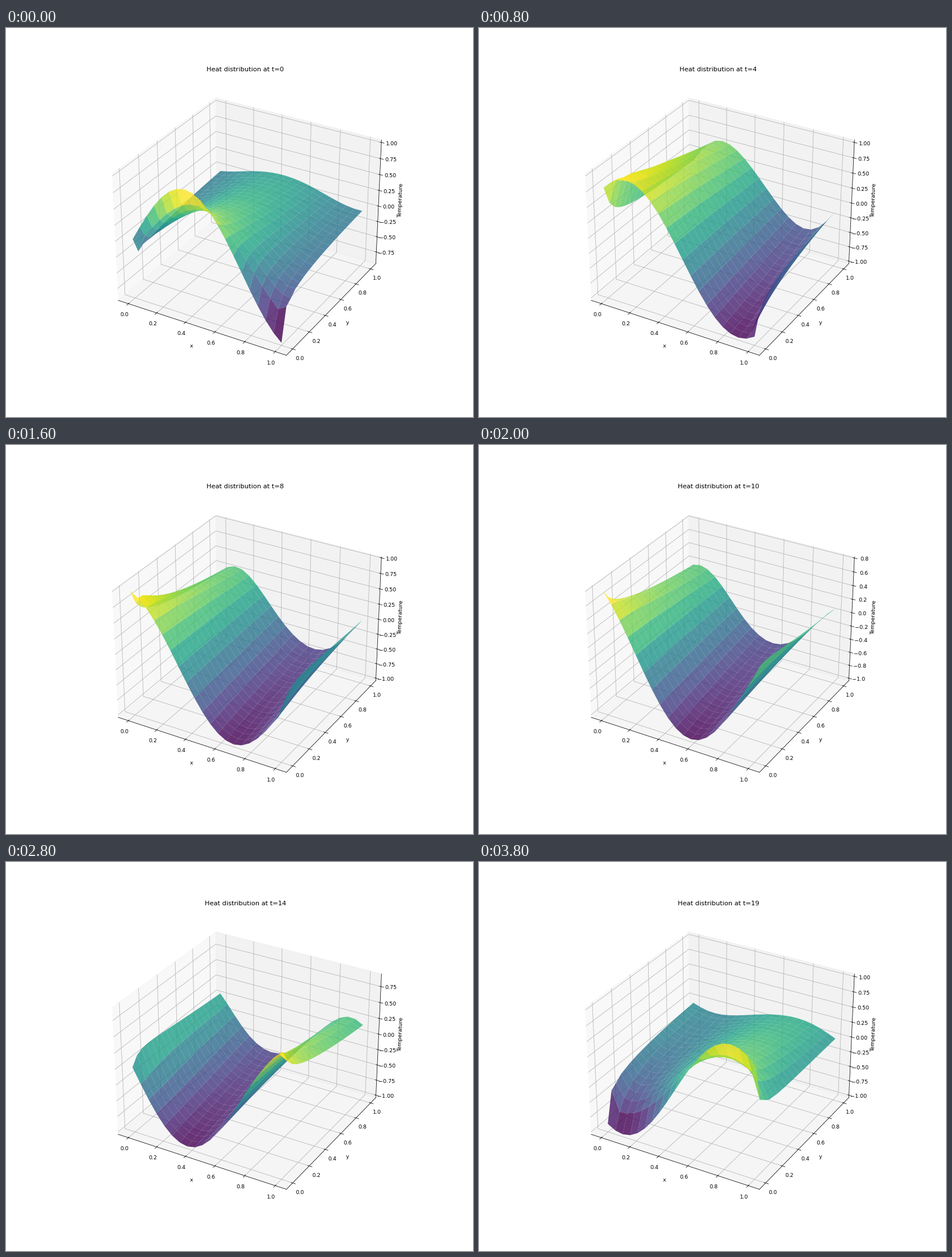
Animation of 820x683 px, one loop 4 s. Source, as a matplotlib script:

```python
import numpy as np
import matplotlib.pyplot as plt
from matplotlib.animation import FuncAnimation

N = 20           # samples along each axis
RATE = 0.19      # diffusion number per step
WAVE = 4.27      # wave number of the starting field
DPI = 820 / 12


def diffuse(u):
    """One explicit heat step on a periodic grid."""
    near = sum(np.roll(u, s, axis=a) for a in (0, 1) for s in (-1, 1))
    return u + RATE * (near - 4 * u)


def solve():
    s = np.linspace(0, 1, N)
    steps = [np.sin(WAVE * (s[:, None] + s[None, :]))]
    while len(steps) < N:
        steps.append(diffuse(steps[-1]))
    return np.array(steps)


field = solve()
X, Y = np.meshgrid(np.linspace(0, 1, N), np.linspace(0, 1, N))

# the tiny excess guards against rounding down to 819 x 682
fig = plt.figure(figsize=(820.00001 / DPI, 683.00001 / DPI), dpi=DPI)
ax = fig.add_subplot(projection="3d")


def draw(i):
    ax.clear()
    ax.plot_surface(X, Y, field[:, :, i], cmap="viridis", alpha=0.8)
    ax.set_xlabel("x")
    ax.set_ylabel("y")
    ax.set_zlabel("Temperature")
    ax.set_title(f"Heat distribution at t={i}")
    return []


anim = FuncAnimation(fig, draw, frames=N, init_func=lambda: draw(0),
                     interval=200, repeat=True, repeat_delay=0)
plt.show()
```
